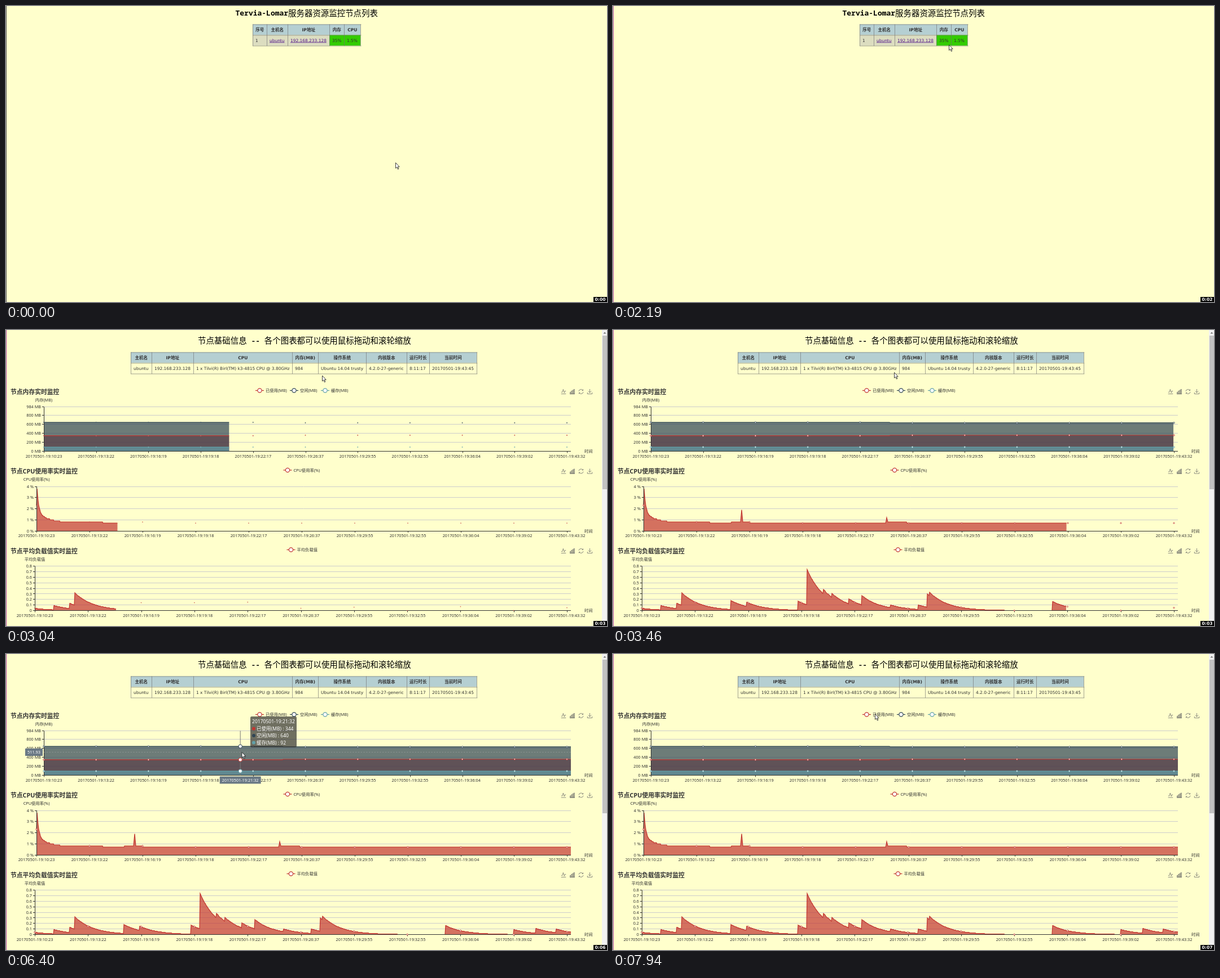
Write an HTML page with a canvas that moves like this. It is 1065 px wide and 526 px high and loops after 8 s.

```html
<!DOCTYPE html>
<html lang="zh">
<head>
<meta charset="utf-8">
<style>
html, body { margin: 0; width: 1065px; height: 526px; overflow: hidden; background: #ffffcc; }
canvas { display: block; }
</style>
</head>
<body>
<canvas id="stage" width="1065" height="526"></canvas>
<script>
const c = document.getElementById('stage').getContext('2d');
const LOOP = 8000, STEP = 132, PHASE = 28, OPEN = 2560;
const RIGHT = 1001, LAST = 994, HEIGHT = 79, BG = '#ffffcc';
const RED = '#c23531', NAVY = '#2f4554', TEAL = '#61a0a8';
const UI = '"Noto Sans", "Noto Sans CJK SC", sans-serif';
const CELL = '"DejaVu Sans", "Noto Sans CJK SC", sans-serif';
const MONO = '"Noto Sans Mono", "Noto Sans CJK SC", monospace';

// Pointer stops: time, x, y
const stops = [
  [150, 690, 278.5], [1380, 541, 70], [1900, 540, 62], [2140, 595, 69], [2800, 575.5, 82.5],
  [3460, 498, 75.5], [3980, 423, 66.5], [4780, 425, 68], [5044, 368, 68], [5500, 337, 69],
  [6364, 417.5, 174.4], [7200, 440, 168], [7816, 464, 106.5]
];

const clamp = v => Math.max(0, Math.min(1, v));
function pointerAt(t) {
  const i = Math.max(1, stops.findIndex(s => s[0] >= t)), end = stops.length - 1;
  const b = t > stops[end][0] ? stops[end] : stops[i], a = stops[stops.indexOf(b) - 1];
  const p = clamp((t - a[0]) / (b[0] - a[0]));
  return [a[1] + (b[1] - a[1]) * p, a[2] + (b[2] - a[2]) * p];
}

// Memory shifts slightly once, halfway through
const used = x => x < 491 ? 344 : 355;
const free = x => x < 491 ? 640 : 630;
const cached = () => 92;

// A startup burst that dies away, two spikes, busy spells and a shallow ripple
function cpu(x) {
  const d = x - 54, within = (a, b) => x >= a && x < b;
  const burst = (3 * Math.exp(-d / 3) + Math.exp(-d / 22)) * Math.min(1, .4 + d);
  const spike = (at, size) => size * clamp(1 - Math.abs(x - at) / 2);
  const busy = within(98, 172) || within(210, 243) || within(485, 521);
  const dip = within(555, 645) && Math.cos((x - 572) / 8) > .4;
  const idle = busy ? .8 : dip ? .6 : .7;
  return Math.max(idle, Math.round((.7 + burst) * 10) / 10) + spike(228, 1.1) + spike(485, .4);
}

// Load average: each burst decays exponentially over a minute
const bursts = [
  [51, .04], [85, .09], [113, .13], [122, .32], [209, .18], [237, .15], [328, .17], [344, .74],
  [373, .38], [388, .31], [418, .21], [441, .27], [492, .1], [541, .1], [557, .3], [561, .33],
  [779, .16], [900, .09], [939, .11], [975, .1]
];
function load(x) {
  const [start, peak] = bursts.filter(b => b[0] <= x).pop();
  return Math.round(peak * Math.exp((start - x) / 31.6) * 100) / 100;
}

const charts = [
  { x: 67, max: 984, step: 200, unit: ' MB', start: 2642, title: '节点内存实时监控', name: '内存(MB)',
    series: [['已使用(MB)', RED, used, 449.5], ['空闲(MB)', NAVY, free, 510.5], ['缓存(MB)', TEAL, cached, 565.5]] },
  { x: 54, max: 4, step: 1, unit: ' %', start: 2807, title: '节点CPU使用率实时监控', name: 'CPU使用率(%)',
    series: [['CPU使用率(%)', RED, cpu, 499]] },
  { x: 51, max: .8, step: .1, unit: '', start: 2807, title: '节点平均负载值实时监控', name: '平均负载值',
    series: [['平均负载值', RED, load, 505]] }
];
charts.forEach((g, i) => {
  g.top = 136.5 + 141.5 * i;
  g.base = g.top + HEIGHT;
  g.y = v => g.base - v / g.max * HEIGHT;
  g.ticks = [g.max];
  for (let v = 0; v < g.max - g.step / 2; v += g.step) g.ticks.push(+v.toFixed(1));
});
const times = '10:23 13:22 16:19 19:18 22:17 26:37 29:55 32:55 36:04 39:02 43:32'.split(' ');
const stamp = s => '20170501-19:' + s;

function text(s, x, y, size, { align = 'left', color = '#333', font = UI, weight = 400 } = {}) {
  c.font = `${weight} ${size}px ${font}`;
  c.textAlign = align;
  c.fillStyle = color;
  c.fillText(s, x, y + size * .36);
  return c.measureText(s).width;
}
function rect(x, y, w, h, color) {
  c.fillStyle = color;
  c.fillRect(x, y, w, h);
}
function line(points, color, width = 1) {
  c.strokeStyle = color;
  c.lineWidth = width;
  c.beginPath();
  points.forEach(p => c.lineTo(...p));
  c.stroke();
}
function ring(x, y, r, color, width) {
  c.beginPath();
  c.arc(x, y, r, 0, 7);
  c.fillStyle = '#fff';
  c.fill();
  c.strokeStyle = color;
  c.lineWidth = width;
  c.stroke();
}

function heading(s, x, y) {
  for (const run of s.match(/[\x00-\x7f]+|[^\x00-\x7f]+/g)) {
    const latin = run.charCodeAt(0) < 128;
    x += text(run, x, y, latin ? 13 : 14.45, { font: MONO, weight: latin ? 700 : 500, color: '#000' });
  }
}

// Columns are as wide as their longest text; the table is centred on mid
function table(mid, top, columns) {
  const measure = (s, font) => {
    c.font = font + CELL;
    return c.measureText(s).width;
  };
  const widths = columns.map(([head, cell]) =>
    10.1 + Math.max(measure(head, '700 7.6px '), measure(cell, '7.45px ')));
  const total = widths.reduce((a, b) => a + b), left = Math.round(mid - total / 2), border = 'rgba(115,115,115,.65)';
  const edges = [left];
  let sum = left;
  columns.forEach(([head, cell, fill, link], i) => {
    const x = edges[i], end = Math.round(sum += widths[i]), w = end - x;
    edges.push(end);
    rect(x, top, w, 19, '#b5cfd2');
    rect(x, top + 19, w, 19, fill || BG);
    text(head, x + w / 2 + .3, top + 10, 7.6, { align: 'center', font: CELL, weight: 700 });
    const color = link ? '#551a8b' : '#333';
    const width = text(cell, x + 5, top + 28.8, 7.45, { font: CELL, color });
    if (link) rect(x + 5, top + 32, width, .8, color);
  });
  for (const x of edges) line([[x + .5, top], [x + .5, top + 38.5]], border);
  for (const y of [0, 19, 38]) line([[left, top + y + .5], [sum + 1, top + y + .5]], border);
}

function nodeList() {
  const sand = '#dcddc0', green = '#33cc00';
  heading('Tervia-Lomar服务器资源监控节点列表', 406.5, 12.5);
  table(533, 32.5, [['序号', '1', sand], ['主机名', 'ubuntu', sand, true],
    ['IP地址', '192.168.233.128', sand, true], ['内存', '35%', green], ['CPU', '1.5%', green]]);
}

const icons = [
  'M-4 1h2l1.4-5 2 6 1.2-3h1.6M-4.3 4h8.6',
  'M-4 4v-3h1.6v3zM-1.8 4v-5h1.6v5zM.4 4v-6.5h1.6v6.5zM2.5 4v-8h1.4v8zM-4.5 4.2h9',
  'M-4-.6a4 4 0 0 1 7.2-1.7M3.6-4v2h-2M4 .6a4 4 0 0 1-7.2 1.7M-3.6 4v-2h2',
  'M0-4.5v6M-2.8-1l2.8 2.8 2.8-2.8M-4.2 1.5v2.6h8.4v-2.6'
].map(d => new Path2D(d));

function toolbox(y) {
  c.strokeStyle = '#666';
  c.lineWidth = .75;
  icons.forEach((icon, i) => {
    c.save();
    c.translate(988 + 15.5 * i, y);
    c.stroke(icon);
    c.restore();
  });
}

function areas(g, end) {
  const traces = g.series.map(([, color, f]) => {
    const points = [];
    for (let x = g.x; x < end; x++) points.push([x, g.y(f(x))]);
    return { color, points: [...points, [end, g.y(f(end))]] };
  });
  c.globalAlpha = .7;
  for (const { color, points } of traces) {
    c.fillStyle = color;
    c.beginPath();
    c.moveTo(g.x, g.base);
    points.forEach(q => c.lineTo(...q));
    c.lineTo(end, g.base);
    c.fill();
  }
  c.globalAlpha = 1;
  for (const { color, points } of traces) line(points, color, 1.2);
}

function chart(g, t) {
  const gap = (LAST - g.x) / 10;
  text(g.title, 8, g.top - 26.5, 10.8, { weight: 700 });
  text(g.name, g.x, g.top - 12.3, 7.3, { align: 'center' });
  text('时间', 1025, g.base, 7.3);
  toolbox(g.top - 27);
  for (const [label, color, , x] of g.series) {
    line([[x - 7.5, g.top - 29], [x + 7.5, g.top - 29]], color, 1.2);
    ring(x, g.top - 29, 3.6, color, 1.2);
    text(label, x + 10.5, g.top - 29, 7.3);
  }
  for (const v of g.ticks) {
    const y = Math.floor(g.y(v)) + .5;
    line([[g.x, y], [RIGHT, y]], '#ccc');
    line([[g.x - 3, y], [g.x, y]], '#333');
    text(v + g.unit, g.x - 5, g.y(v), 7.3, { align: 'right' });
  }

  const p = clamp((t - g.start) / 825);
  if (p > 0) areas(g, g.x + p * (RIGHT - g.x));

  const axis = Math.floor(g.base) + .5;
  line([[g.x + .5, g.top], [g.x + .5, g.base]], '#333');
  line([[g.x, axis], [RIGHT, axis]], '#333');
  times.forEach((s, i) => {
    const x = g.x + gap * i, tick = Math.round(x) + .5;
    line([[tick, g.base], [tick, g.base + 3]], '#333');
    text(stamp(s), x, g.base + 8.5, 7.3, { align: 'center' });
    if (p > 0) for (const [, color, f] of g.series) ring(x, g.y(f(x)), .3 + p, color, .8);
  });
}

function timeAt(x) {
  const sec = s => s.slice(0, 2) * 60 + +s.slice(3);
  const at = (x - 67) / 92.7, i = Math.floor(at), a = sec(times[i]);
  const total = Math.floor(a + (sec(times[i + 1]) - a) * (at - i) - .6);
  const two = n => String(n).padStart(2, '0');
  return stamp(two(Math.floor(total / 60)) + ':' + two(total % 60));
}

function tooltip(px, py) {
  const g = charts[0], x = Math.round(px - 2.5) + .2, when = timeAt(x), y = Math.floor(py) + .5;
  line([[x, g.top], [x, g.base]], '#777');
  c.setLineDash([2.4, 2.4]);
  line([[g.x, y], [RIGHT, y]], 'rgba(170,170,170,.6)', .8);
  c.setLineDash([]);
  for (const [, color, f] of g.series) ring(x, g.y(f(x)), 3.2, color, 1);

  const white = { color: '#fff', align: 'center' };
  rect(34, py - 6.4, 31, 13, '#6a7985');
  text(((g.base - py) / HEIGHT * g.max).toFixed(2), 49.5, py + .3, 7.3, white);
  rect(x - 36.5, 217.5, 73, 13, '#6a7985');
  text(when, x, 224, 7.3, white);

  const left = px + 15.5, top = py - 63.4;
  c.fillStyle = 'rgba(50,50,50,.7)';
  c.beginPath();
  c.roundRect(left, top, 82, 55, 2.4);
  c.fill();
  text(when, left + 3, top + 9, 8.55, { color: '#fff' });
  g.series.forEach(([label, color, f], i) => {
    const row = top + 21.7 + 12.4 * i;
    c.fillStyle = color;
    c.beginPath();
    c.arc(left + 6, row, 3, 0, 7);
    c.fill();
    text(`${label} : ${f(x)}`, left + 11, row, 8.55, { color: '#fff' });
  });
}

function nodeDetail(t) {
  heading('节点基础信息 -- 各个图表都可以使用鼠标拖动和滚轮缩放', 340, 19);
  table(528, 39.5, [['主机名', 'ubuntu'], ['IP地址', '192.168.233.128'],
    ['CPU', '1 x Tilvi(R) Birl(TM) k3-4815 CPU @ 3.80GHz'], ['内存(MB)', '984'],
    ['操作系统', 'Ubuntu 14.04 trusty'], ['内核版本', '4.2.0-27-generic'],
    ['运行时长', '8:11:17'], ['当前时间', '20170501-19:43:45']]);
  charts.forEach(g => chart(g, t));
  rect(1056, 0, 9, 526, '#f1f1f1');
  rect(1057, 10, 8, 273, '#c1c1c1');
  c.fillStyle = '#777';
  c.fill(new Path2D('M1058.5 6.5l2.5-3 2.5 3z'));
}

const arrow = new Path2D('M.5 0v9.8l2.2-2 1.7 3.8 1.5-.7-1.7-3.6h3z');
const beam = new Path2D('M-2.5-4.8h2l.5.5.5-.5h2M0-4.3v8.6M-2.5 4.8h2l.5-.5.5.5h2');
const hand = new Path2D('M-1 0h1.8v4l5 1v4l-1.5 3h-5l-3.5-5 1.2-.8 2 1.6z');

function pointer(x, y, detail) {
  const shape = detail ? (y < 72 ? beam : arrow) : (y < 67 ? hand : arrow);
  c.save();
  c.translate(x, y);
  if (shape !== beam) {
    c.fillStyle = '#fff';
    c.fill(shape);
  }
  c.strokeStyle = '#111';
  c.lineWidth = shape === beam ? 1 : .8;
  c.stroke(shape);
  c.restore();
}

function draw(t) {
  const detail = t >= OPEN - STEP / 2, [x, y] = pointerAt(t);
  rect(0, 0, 1065, 526, BG);
  if (detail) nodeDetail(t); else nodeList();
  rect(0, 0, 1, 526, t < 1790 ? '#555' : '#b84fa8');
  if (t > 6200 && y > 136) tooltip(x, y);
  pointer(x, y, detail);
  rect(1041, 517, 24, 9, '#000');
  text('0:0' + Math.floor((t + 350) / 1040), 1053, 521, 7.6,
    { align: 'center', color: '#fff', weight: 700, font: CELL });
}

// The picture is held between steps, as in a screen capture
function tick() {
  const now = performance.now() % LOOP;
  draw(Math.max(0, Math.floor((now - PHASE) / STEP) * STEP + PHASE));
  requestAnimationFrame(tick);
}
tick();
</script>
</body>
</html>
```
